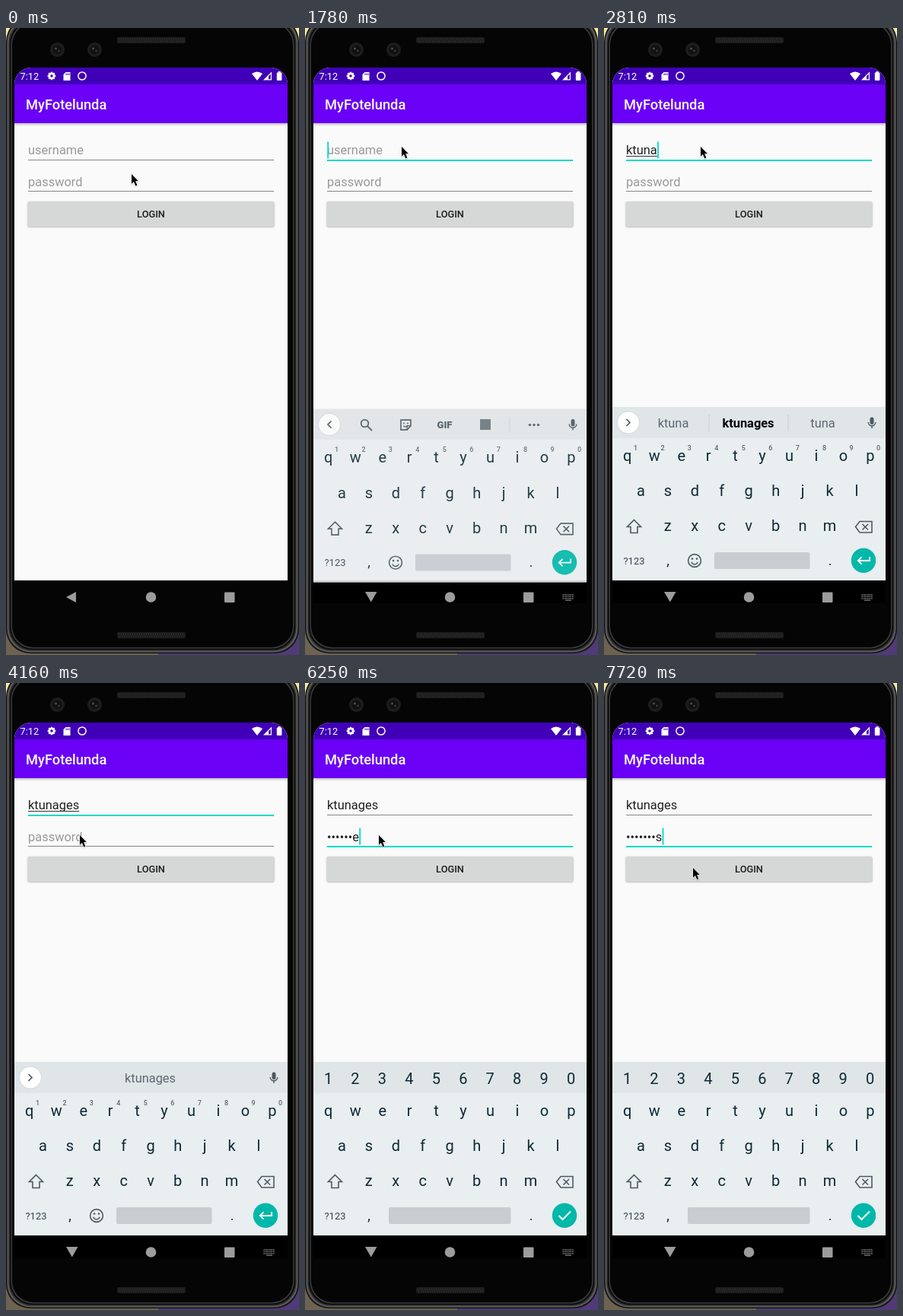
An HTML page with a canvas that plays this animation: 385 by 824 pixels, repeating every 8000 ms.

```html
<!DOCTYPE html>
<html lang="en">
<head>
<meta charset="utf-8">
<title>Login screen</title>
<style>
html, body { margin: 0; width: 100%; height: 100%; overflow: hidden; background: #050505; }
canvas { display: block; width: 385px; height: 824px; }
</style>
</head>
<body>
<canvas id="stage"></canvas>
<script>
const W = 385, H = 824, LOOP = 8000;
const canvas = document.getElementById('stage');
const dpr = window.devicePixelRatio || 1;
canvas.width = W * dpr;
canvas.height = H * dpr;
const c = canvas.getContext('2d');

const TEAL = '#03dac5', KEY = '#0e2a33', ICON = '#4d5a61', HINT = '#999';
const FONT = 'Roboto, Arial, sans-serif';
const USER = 'ktunages', PASS = 'alunages';

// Each step overrides part of the state from its time on.
const steps = [
  [0, { mouse: [165, 192], focus: '', user: 0, pass: 0, caret: false, kb: null,
        mode: 'tools', words: [], spell: false, press: 0 }],
  [150, { mouse: [159, 184] }],
  [290, { mouse: [148, 169] }],
  [440, { mouse: [144, 164] }],
  [1040, { mouse: [135, 160] }],
  [1190, { mouse: [127, 156] }],
  [1330, { focus: 'user', caret: true }],
  [1480, { kb: [0.25, 24] }],
  [1630, { kb: [0.65, 11] }],
  [1780, { kb: [0.9, 2.6] }],
  [1920, { kb: [1, 0] }],
  [2220, { user: 1, spell: true, mode: 'words', words: ['k', 'kind', 'kitchens'] }],
  [2370, { user: 2, words: ['kt', USER, 'kitchens'] }],
  [2510, { user: 3, words: ['ktu', USER, 'kitchens'] }],
  [2810, { user: 5, words: ['ktuna', USER, 'tuna'] }],
  [3110, { user: 6, words: ['ktunag', USER, 'tune'] }],
  [3410, { user: 7, words: ['ktunage', USER, 'tune'] }],
  [3710, { user: 8, words: [USER] }],
  [3860, { mouse: [121, 166] }],
  [4010, { mouse: [106, 188] }],
  [4160, { mouse: [97, 200], caret: false }],
  [4310, { focus: 'pass', caret: true, spell: false }],
  [4460, { mode: 'digits' }],
  [4910, { caret: false }],
  [5060, { caret: true, pass: 1 }],
  [5360, { pass: 2 }],
  [5510, { pass: 3 }],
  [5650, { pass: 4 }],
  [5800, { pass: 5 }],
  [6100, { pass: 6 }],
  [6250, { pass: 7 }],
  [6550, { pass: 8 }],
  [6700, { mouse: [102, 214] }],
  [6840, { mouse: [113, 236] }],
  [6990, { mouse: [117, 243] }],
  [7290, { caret: false }],
  [7430, { press: 0.5 }],
  [7580, { press: 1 }],
  [7720, { press: 0, caret: true }]
];

function stateAt(t) {
  const s = {};
  for (const [at, change] of steps) if (at <= t) Object.assign(s, change);
  return s;
}

function text(str, x, y, size, color, weight = 400, align = 'left') {
  c.font = `${weight} ${size}px ${FONT}`;
  c.fillStyle = color;
  c.textAlign = align;
  c.fillText(str, x, y);
}
const label = (str, x, y, size = 20, color = KEY, weight = 400) =>
  text(str, x, y, size, color, weight, 'center');

function rect(x, y, w, h, color) {
  c.fillStyle = color;
  c.fillRect(x, y, w, h);
}
function trace(pts, close) {
  c.beginPath();
  for (let i = 0; i < pts.length; i += 2) c.lineTo(pts[i], pts[i + 1]);
  if (close) c.closePath();
}
function poly(pts, color) {
  trace(pts, true);
  c.fillStyle = color;
  c.fill();
}
function line(pts, color, width = 1, close = false) {
  trace(pts, close);
  c.strokeStyle = color;
  c.lineWidth = width;
  c.stroke();
}
function disc(x, y, r, color) {
  c.beginPath();
  c.arc(x, y, r, 0, 7);
  c.fillStyle = color;
  c.fill();
}
function arc(x, y, r, color, width = 1, from = 0, to = Math.PI * 2) {
  c.beginPath();
  c.arc(x, y, r, from, to);
  c.strokeStyle = color;
  c.lineWidth = width;
  c.stroke();
}
function round(x, y, w, h, r, fill, stroke, width = 1) {
  c.beginPath();
  c.roundRect(x, y, w, h, r);
  if (fill) { c.fillStyle = fill; c.fill(); }
  if (stroke) { c.strokeStyle = stroke; c.lineWidth = width; c.stroke(); }
}

function speaker(y) {
  round(146, y, 90, 8, 2, '#1d1d1d');
  for (let x = 148; x < 235; x += 3) {
    rect(x, y + 1.5, 1, 2, '#303030');
    rect(x + 1, y + 4.5, 1, 2, '#303030');
  }
}

// Nested shells from the outer metal edge to the black front.
function phone() {
  rect(0, 0, W, 400, '#f3eaa0');
  rect(0, 400, 200, 424, '#6d6350');
  rect(200, 400, 185, 424, '#513a78');
  const shells = [[0, '#161616'], [1.5, '#5a5a5a'], [3.5, '#2c2c2c'],
                  [5, '#0a0a0a'], [6.5, '#3a3a3a'], [8, '#050505']];
  for (const [inset, color] of shells) {
    round(inset, inset - 14, W - 2 * inset, 836 - 2 * inset, 32 - inset / 2, color);
  }
  speaker(12);
  speaker(794);
  for (const x of [67.5, 116.5]) {
    disc(x, 28.5, 9.5, '#1c1d1f');
    disc(x, 28.5, 6, '#111');
    disc(x - 2, 27, 1.5, '#4a4e52');
    disc(x + 2, 30, 1.2, '#43474a');
  }
}

function statusBar() {
  rect(11, 52, 359, 22, '#4000b8');
  text('7:12', 18.5, 67.8, 12.8, '#fff');
  for (let i = 0; i < 4; i++) {
    const a = i * Math.PI / 4, dx = Math.cos(a) * 5.3, dy = Math.sin(a) * 5.3;
    line([60 - dx, 63 - dy, 60 + dx, 63 + dy], '#fff', 2.4);
  }
  arc(60, 63, 3, '#fff', 2.4);
  disc(60, 63, 1.8, '#4000b8');
  poly([78.5, 58, 84.5, 58, 84.5, 69, 75.5, 69, 75.5, 61], '#fff');
  for (const x of [78.5, 80.5, 82.5]) rect(x, 59.5, 1, 2.5, '#4000b8');
  arc(100, 63, 5.1, '#fff', 1.5);
  c.beginPath();
  c.moveTo(330, 69);
  c.lineTo(323, 60);
  c.quadraticCurveTo(330, 55, 337, 60);
  c.fillStyle = '#fff';
  c.fill();
  poly([349, 57.5, 349, 68.5, 338, 68.5], '#fff');
  poly([347.8, 60.5, 347.8, 67.3, 345, 67.3, 345, 63.3], '#4000b8');
  round(355.8, 58.5, 6.6, 10.5, 1, '#fff');
  rect(357.6, 57, 3, 2, '#fff');
}

function field(y, value, hint, focused, s) {
  const rule = Math.round(y + 6.6);
  text(value || hint, 29, y, 16.45, value ? '#212121' : HINT);
  const w = value ? c.measureText(value).width : 0;
  if (focused && s.spell && w) rect(29, Math.round(y + 1.6), w, 1, '#333');
  rect(29, rule, 323, focused ? 2 : 1, focused ? TEAL : '#868686');
  if (focused && s.caret) rect(29.3 + w, y - 17, 1.8, 22, TEAL);
}

function button(press) {
  c.save();
  c.shadowColor = `rgba(0,0,0,${0.3 + press * 0.15})`;
  c.shadowBlur = (2 + press * 3) * dpr;
  c.shadowOffsetY = (0.8 + press) * dpr;
  round(28.6, 228, 323.8, 33, 2, '#d6d7d7');
  c.restore();
  if (press) {
    c.save();
    c.beginPath();
    c.roundRect(28.6, 228, 323.8, 33, 2);
    c.clip();
    disc(117 + press * 40, 244, press * 220, 'rgba(0,0,0,.11)');
    c.restore();
  }
  label('LOGIN', 190.5, 249.2, 12.8, '#1c1c1c', 500);
}

function app(s) {
  c.save();
  c.beginPath();
  c.roundRect(11, 52, 359, 674, [22, 22, 0, 0]);
  c.clip();
  rect(11, 52, 359, 674, '#fafafa');
  statusBar();
  rect(11, 74, 359, 51, '#6a00f5');
  const g = c.createLinearGradient(0, 125, 0, 129);
  g.addColorStop(0, 'rgba(0,0,0,.24)');
  g.addColorStop(1, 'rgba(0,0,0,0)');
  rect(11, 125, 359, 4, g);
  text('MyFotelunda', 26, 106.8, 18.3, '#fff', 500);
  const masked = s.pass ? '•'.repeat(s.pass - 1) + PASS[s.pass - 1] : '';
  field(166.4, USER.slice(0, s.user), 'username', s.focus === 'user', s);
  field(207.6, masked, 'password', s.focus === 'pass', s);
  button(s.press);
  c.restore();
}

function mic() {
  round(349.5, 511.5, 5, 9.5, 2.5, ICON);
  arc(352, 518, 4.8, ICON, 1.4, 0, Math.PI);
  rect(351.3, 522.5, 1.4, 3.5, ICON);
}

function chevron(dir) {
  c.save();
  c.shadowColor = 'rgba(0,0,0,.15)';
  c.shadowBlur = 2 * dpr;
  disc(32, 518.5, 14, '#fff');
  c.restore();
  line([32 - dir * 2.5, 514, 32 + dir * 2, 518.5, 32 - dir * 2.5, 523], ICON, 1.7);
}

function tools() {
  chevron(-1);
  arc(78.5, 517, 4.8, ICON, 1.8);
  line([82, 520.5, 88, 526.5], ICON, 2);
  line([126, 512.5, 139, 512.5, 139, 520, 134, 525.5, 126, 525.5], ICON, 1.6, true);
  line([139, 520, 134, 520, 134, 525], ICON, 1.2);
  disc(130, 517, 1, ICON);
  disc(135, 517, 1, ICON);
  arc(132, 518.5, 3, ICON, 1.2, 0.4, 2.6);
  label('GIF', 183.5, 523.2, 13, ICON, 900);
  rect(230, 511.5, 14, 14, '#6d787e');
  rect(268.5, 509, 1, 20, '#cbd2d5');
  for (const x of [295.5, 301, 306.5]) disc(x, 519, 1.7, ICON);
  mic();
}

function words(list) {
  chevron(1);
  if (list.length === 1) label(list[0], 189.5, 524.8, 16.4, '#5c686e');
  else {
    label(list[0], 91, 524.8, 16.4, '#5c686e');
    label(list[1], 189.5, 524.8, 16.4, '#000', 700);
    label(list[2], 287.5, 524.8, 16.4, '#5c686e');
    rect(137.5, 508, 1, 22, '#c9d0d4');
    rect(241.5, 508, 1, 22, '#c9d0d4');
  }
  mic();
}

function keyRow(keys, x, y) {
  [...keys].forEach((k, i) => label(k, x + i * 35.45, y));
}

function keyboard(s) {
  const [alpha, dy] = s.kb, digits = s.mode === 'digits';
  c.save();
  c.globalAlpha = alpha;
  c.translate(0, dy);
  rect(11, 498, 359, 41, '#e0e5e8');
  rect(11, 539, 359, 187, '#e9eef1');
  if (digits) keyRow('1234567890', 30.5, 526.8);
  else if (s.mode === 'words') words(s.words);
  else tools();

  keyRow('qwertyuiop', 30.8, 568.8);
  if (!digits) [...'1234567890'].forEach((n, i) =>
    label(n, 41.5 + i * 35.45, 554.5, 9, '#5c696f', 500));
  keyRow('asdfghjkl', 48.4, 615);
  keyRow('zxcvbnm', 83.8, 661);

  line([39.5, 646.5, 48.5, 655.5, 44, 655.5, 44, 663.5, 35, 663.5, 35, 655.5, 30.5, 655.5],
    ICON, 1.6, true);
  line([330.5, 655.5, 336, 648.5, 352, 648.5, 352, 663, 336, 663], ICON, 1.6, true);
  line([339.5, 652, 347, 659.5], ICON, 1.6);
  line([347, 652, 339.5, 659.5], ICON, 1.6);

  label('?123', 39.5, 704.6, 13, '#34464e');
  label(',', 84, 705.5, 18);
  label('.', 297, 705.5, 18);
  const left = digits ? 110 : 145;
  round(left, 689, 270.5 - left, 22, 2, '#c8cdd1');
  if (!digits) {
    arc(119, 700, 8.4, ICON, 1.6);
    disc(116, 697.5, 1.3, ICON);
    disc(122, 697.5, 1.3, ICON);
    arc(119, 700.5, 4.4, ICON, 1.5, 0.3, 2.84);
  }
  disc(341, 699.7, 16.2, '#00b8a9');
  if (digits) line([333.5, 700, 338.5, 705, 349, 694.5], '#fff', 2);
  else {
    line([349, 695, 349, 700, 334, 700], '#fff', 1.9);
    line([338.5, 695.3, 333.8, 700, 338.5, 704.7], '#fff', 1.9);
  }
  c.restore();
}

function navBar(open) {
  const gray = '#9c9c9c';
  if (open) rect(11, 729, 359, 27, '#000');
  poly(open ? [79, 741, 94.5, 741, 86.8, 754.5] : [92, 741, 92, 755, 79, 748], gray);
  disc(190.5, 748, 6.8, gray);
  round(287, 741.5, 13.5, 13.5, 1, gray);
  if (!open) return;
  // Small keyboard glyph made of dim key dots.
  for (let x = 338.5; x < 353; x += 2.5)
    for (const y of [744, 746.5, 749]) rect(x, y, 1.6, 1.6, '#777');
  rect(342, 751.5, 8, 1.3, '#777');
}

function pointer([x, y]) {
  c.save();
  c.translate(x, y);
  c.scale(0.88, 0.88);
  c.shadowColor = 'rgba(0,0,0,.25)';
  c.shadowBlur = 1.5 * dpr;
  c.shadowOffsetY = 0.7 * dpr;
  const shape = [0, 0, 0, 14.5, 3.3, 11.4, 6, 17.5, 8.4, 16.4, 5.8, 10.4, 10, 10.2];
  line(shape, '#fff', 1.7, true);
  c.shadowColor = 'transparent';
  poly(shape, '#000');
  c.restore();
}

function draw(now) {
  const s = stateAt(now % LOOP);
  c.setTransform(dpr, 0, 0, dpr, 0, 0);
  phone();
  app(s);
  if (s.kb) keyboard(s);
  navBar(s.kb);
  pointer(s.mouse);
}

const start = performance.now();
function tick() {
  draw(performance.now() - start);
  requestAnimationFrame(tick);
}
tick();
</script>
</body>
</html>
```
